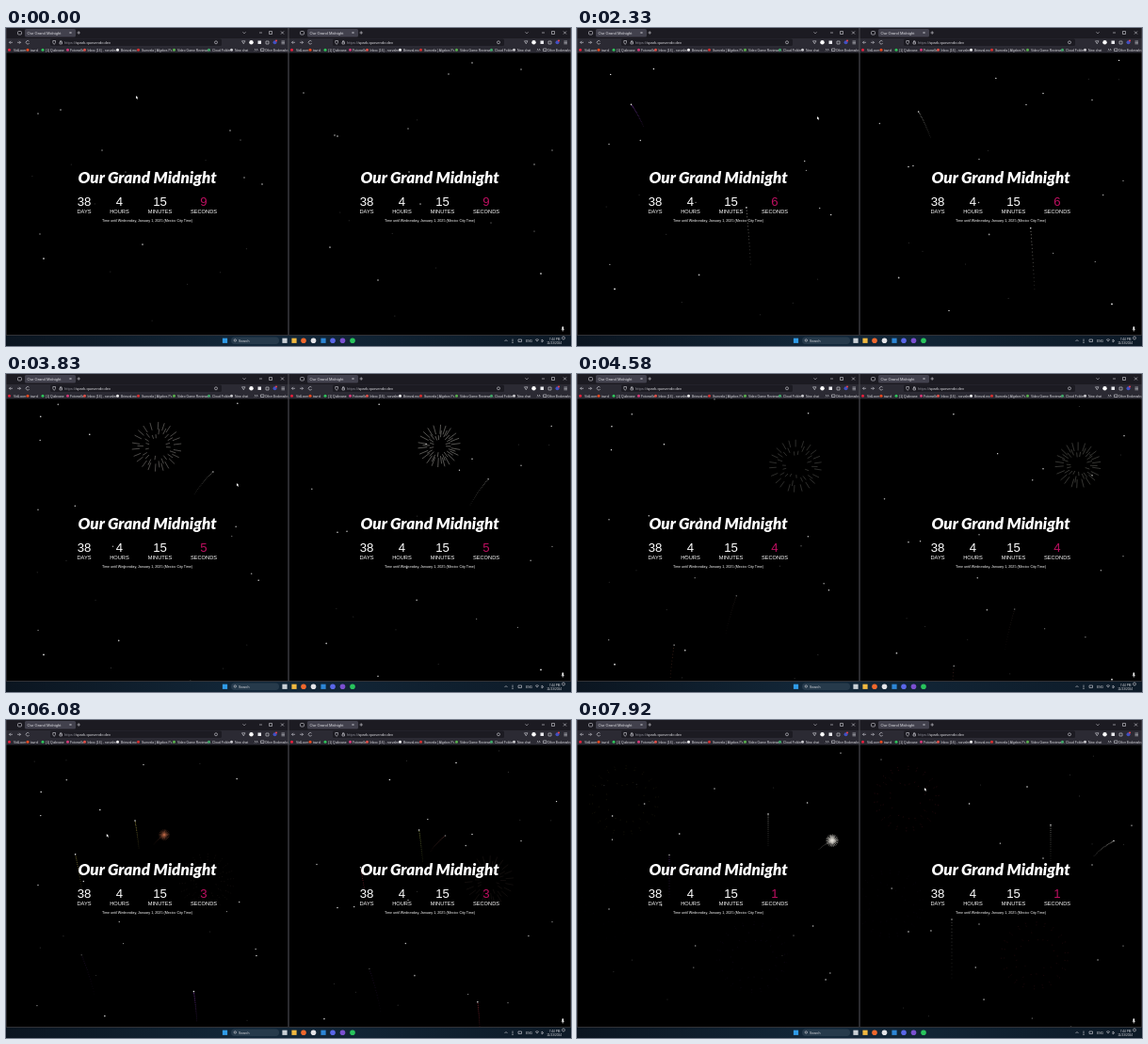
Write an HTML page with a canvas that moves like this. It is 600 px wide and 338 px high and loops after 8000 ms.

```html
<!DOCTYPE html>
<html lang="en">
<head>
<meta charset="utf-8">
<title>Midnight timer</title>
<style>
  html, body { margin: 0; width: 100%; height: 100%; overflow: hidden; background: #000; }
  canvas, svg { position: absolute; left: 0; top: 0; width: 600px; height: 338px; }
  text { font-family: "Liberation Sans", Arial, sans-serif; fill: #fff; }
  .ui { font-size: 3.6px; fill: #dddde2; }
  .tab { font-size: 4.1px; }
  .title { font: italic 900 17px Lato, cursive; }
  .num { font-size: 13.2px; }
  .label { font-size: 5.7px; }
  .note { font-size: 3.7px; }
  .mid text, .title { text-anchor: middle; }
  .seconds { fill: #bd0f60; }
  .line { fill: none; stroke: #d4d4da; stroke-width: .6; }
</style>
</head>
<body>
<canvas width="600" height="338"></canvas>
<svg viewBox="0 0 600 338">
  <defs>
    <linearGradient id="bar">
      <stop offset="0" stop-color="#0b1520"/>
      <stop offset=".45" stop-color="#13283a"/>
      <stop offset="1" stop-color="#0d1a27"/>
    </linearGradient>
    <g id="window">
      <rect width="300" height="10.5" fill="#1c1b22"/>
      <rect x="20" y="1" width="54" height="8.5" rx="1.5" fill="#42414d"/>
      <rect y="10.5" width="300" height="16" fill="#2b2a33"/>
      <rect x="47" y="11.5" width="182" height="7.5" rx="1.5" fill="#1c1b22"/>
      <rect x="12.5" y="3.5" width="4" height="3.5" rx="1" class="line"/>
      <text class="ui tab" x="22.5" y="6.5">Our Grand Midnight</text>
      <path class="line" d="M67.5 4l2 2m0-2l-2 2M75.5 5h3.4m-1.7-1.7v3.4M251.500 4.300l1.500 1.500l1.500-1.500M269 5h3M279.500 3.500h3v3h-3zM292 3.500l3 3m0-3l-3 3"/>
      <path class="line" d="M7 15.300H3.500m1.500-1.500l-1.500 1.500l1.500 1.500M12 15.300h3.500m-1.500-1.500l1.500 1.500l-1.500 1.500M24.500 14.200a1.800 1.800 0 1 0 .2 1.800M49.800 13.500h2.700v2q-.3 1.400-1.400 1.800q-1-.4-1.300-1.800zM57 15h2.500v2H57zM57.500 15v-1.200h1.500V15"/>
      <text class="ui tab" x="62" y="16.700"><tspan fill="#8b8b95">https://</tspan>spark.quovendo.dev</text>
      <circle class="line" cx="223" cy="15.300" r="1.500"/>
      <path class="line" d="M250.500 13.800h3.500l-1.700 3zM276 14h3v3h-3zM292.500 14h3.500m-3.500 1.400h3.500m-3.500 1.400h3.500"/>
      <circle cx="260.500" cy="15.300" r="2.200" fill="#fff"/>
      <rect x="267.500" y="13.500" width="3.500" height="3.500" fill="#e8e8ec"/>
      <circle cx="285.500" cy="15.300" r="2" fill="#4150c0"/>
      <circle cx="287" cy="13.500" r="1.100" fill="#e04050"/>
      <g id="bookmarks"></g>
      <path class="line" d="M264 22l1.200 1.200l-1.200 1.200M266 22l1.200 1.200l-1.200 1.200M270.500 22h3.500v2.500h-3.500z"/>
      <text class="ui" x="275" y="24.500" style="font-size:3.2px">Other Bookmarks</text>
      <text class="title" x="150" y="165">Our Grand Midnight</text>
      <g class="mid">
        <g class="num">
          <text x="83" y="189">38</text>
          <text x="120.500" y="189">4</text>
          <text x="163.500" y="189">15</text>
          <text class="seconds" id="seconds" x="210" y="189">9</text>
        </g>
        <g class="label">
          <text x="83" y="197.300">DAYS</text>
          <text x="120.500" y="197.300">HOURS</text>
          <text x="163.500" y="197.300">MINUTES</text>
          <text x="210" y="197.300">SECONDS</text>
        </g>
        <text class="note" x="150" y="206.300">Time until Wednesday, January 1, 2025 (Mexico City Time)</text>
      </g>
      <path d="M.25 0V326.500H299.750V0" fill="none" stroke="#55555c" stroke-width=".6"/>
    </g>
  </defs>
  <use href="#window"/>
  <use href="#window" x="300"/>
  <rect y="327" width="600" height="11" fill="url(#bar)"/>
  <rect x="239" y="328.500" width="51" height="7.500" rx="3.700" fill="#263a4b"/>
  <circle class="line" cx="243.300" cy="332" r="1.200"/>
  <text class="ui" x="247" y="333.500">Search</text>
  <g id="apps"></g>
  <path class="line" d="M529.500 333l1.500-1.500l1.500 1.500M538 330.500v2.500m-1 1.200h2M544 331h3.500v2.500H544zM562 331.500q2-1.500 4 0m-3 1.300q1-.8 2 0M569 331v3l1.800-1.500z"/>
  <text class="ui" x="552" y="333.500" style="font-size:3.200px">ENG</text>
  <g text-anchor="end" style="font-size:3.200px">
    <text x="588.500" y="331.600" class="ui" style="font-size:inherit">7:44 PM</text>
    <text x="590" y="335.800" class="ui" style="font-size:inherit">11/23/2024</text>
  </g>
  <circle class="line" cx="592" cy="329.500" r="1.500"/>
  <path d="M591.300 318v2.200" stroke="#fff" stroke-width="1.600" stroke-linecap="round"/>
  <path d="M589.600 320.300q1.700 2.200 3.400 0M591.300 321.400v1.200" fill="none" stroke="#fff" stroke-width=".5"/>
  <path id="cursor" d="M0 0v4l1-.8l.8 1.600l.7-.4l-.8-1.500h1.300z" fill="#fff"/>
</svg>
<script>
const LOOP = 8000, FPS = 12, GROUND = 326;
const TRAIL = 18, TRAIL_STEP = 1 / 60, BURST_LIFE = 1.15;
const ctx = document.querySelector('canvas').getContext('2d');
const seconds = document.getElementById('seconds');
const cursor = document.getElementById('cursor');

// icon x, text x, colour, label
const bookmarks = [
  [3.5, 8, '#e8203c', 'VidLoom'], [23, 26, '#f04a20', 'tavrol'],
  [39, 42, '#2fc45a', '(1) Quibvane'], [65.5, 68, '#d63a78', 'Fotomelle'],
  [83.5, 86.5, '#e05048', 'Inbox (16) - norvalm...'], [118.5, 122, '#f2f2f2', 'Brimzal.mx'],
  [140.5, 144, '#d83030', 'Sumvela | Algebra Pr...'], [178.5, 182, '#58b04c', 'Video Game Reviews,...'],
  [215.5, 219, '#3fa868', 'Cloud Folder'], [239.5, 243, '#c8c8cc', 'New chat']
];
document.getElementById('bookmarks').innerHTML = bookmarks.map(([ix, tx, color, label]) =>
  `<circle cx="${ix}" cy="23.2" r="1.5" fill="${color}"/>
   <text class="ui" x="${tx}" y="24.5" style="font-size:3.4px">${label}</text>`).join('');

const apps = [[232.5, '#2f9be8', 1], [296, '#c9d0d6', 1], [306, '#f0b840', 1], [316, '#f0682c'],
  [326.500, '#e4e4e8'], [337, '#2c86d6', 1], [347, '#5a66e8'], [357.500, '#7a4fd0'], [368, '#28c45c']];
document.getElementById('apps').innerHTML = apps.map(([x, color, square]) => square
  ? `<rect x="${x - 2.6}" y="329.7" width="5.2" height="5.2" fill="${color}"/>`
  : `<circle cx="${x}" cy="332.3" r="2.8" fill="${color}"/>`).join('');

// x, y at the start and sideways speed; all fall at the same rate
const FALL = 13.9;
const leftStars = [
  [34, 91, 0], [58, 87, 4], [238, 109, 1.6], [249, 119, -2.4], [145, 230, -6.6], [127, 153, -.4],
  [102, 130, 3], [253, 159, 2], [40, 245, 0], [35, 17, .3], [36, -8, .2], [70, 11, 4.9],
  [146, -37, 0], [247, -22, -.3], [40, -21, 4], [272, 166, -1], [36, 219, -.5], [280, -75, 0]
];
const rightStars = [
  [316, 69, 2.3], [349, 114, 3.4], [470, 49, 3], [515, 207, -4], [344, 233, -1], [561, 216, -4.6],
  [427, 107, 0], [561, 145, -1], [568, 261, 0], [570, 2, 2.4], [377, -21, 5], [478, -39, 0],
  [428, 153, -.6], [352, 115, 0], [440, 187, -1], [495, 37, 0], [580, 130, 0], [443, 21, .8],
  [547, 44, 0], [395, 268, 0], [323, -68, 0]
];

// right window runs a little behind the left one
const rocket = (launch, x0, burst, x1, y1, leftColor, rightColor, dim = 1, lag = .11) =>
  ({ launch, x0, burst, x1, y1, colors: [leftColor, rightColor], dim, lag });
const WHITE = '#e0dcd4', PURPLE = '#9a48d8', GOLD = '#c8b850', RED = '#c03848', GREY = '#b8b8b0';
const rockets = [
  rocket(.83, 112, 2.45, 52, 75, PURPLE, GREY),
  rocket(1.755, 187.6, 3.3, 160, 75, WHITE, WHITE),
  rocket(2.4, 141, 4, 232, 95, GREY, GREY, .8),
  rocket(4.4, 99, 6, 168, 122, '#b86848', '#a86058', .55),
  rocket(4, 150, 5.45, 213, 168, '#806058', '#806058', .4),
  rocket(4.8, 151.6, 6.35, 133, 90, GOLD, '#a8b850'),
  rocket(5.03, 95, 6.9, 50, 77, GOLD, RED),
  rocket(5.6, 100, 6.85, 32, 188, PURPLE, PURPLE, .3),
  rocket(5.75, 203, 6.85, 186, 243, PURPLE, RED),
  rocket(6.27, 180, 7.82, 271, 128, WHITE, WHITE),
  rocket(6.68, 203, 8.3, 203, 72, GREY, GREY),
  rocket(7.02, 98, 8.5, 98, 90, PURPLE, GREY, .7, .41)
];

// time in seconds, x, y
const pointer = [[0, 138, 72], [1.083, 39, 75], [2.333, 255, 94], [3.833, 245, 116],
  [5.333, 16, 189], [6.75, 187.5, 60.5], [7.917, 369, 72], [8, 372, 72]];

function random(seed) {
  const v = Math.sin(seed * 127.1 + 11.7) * 43758.5453;
  return v - Math.floor(v);
}

function dot(x, y, size, color, alpha) {
  ctx.globalAlpha = alpha;
  ctx.fillStyle = color;
  ctx.beginPath();
  ctx.arc(x, y, size, 0, 7);
  ctx.fill();
}

function drawStars(stars, t) {
  stars.forEach(([x, y, vx], i) =>
    dot(x + vx * t, y + FALL * t, .55 + .3 * random(i), '#fff', .55 + .45 * random(i + 40)));
}

function drawDimStars(left, t) {
  for (let i = 0; i < 12; i++) {
    const seed = left + i * 3.1;
    const x = left + 300 * random(seed) + 4 * (random(seed + 1) - .5) * t;
    dot(x, -80 + 400 * random(seed + 2) + FALL * t, .55, '#fff', .2);
  }
}

function rocketAt(r, t) {
  const p = (t - r.launch) / (r.burst - r.launch);
  return [r.x0 + (r.x1 - r.x0) * p ** 1.3, GROUND - (GROUND - r.y1) * (1.7 * p - .7 * p * p)];
}

function drawTrail(r, t, left, color) {
  for (let k = 0; k < TRAIL; k++) {
    const past = t - k * TRAIL_STEP;
    if (past < r.launch || past > r.burst) continue;
    const [x, y] = rocketAt(r, past);
    dot(left + x, y, k ? .5 : .8, k ? color : '#fff', r.dim * (k ? .75 * (1 - k / 22) : .9));
  }
}

const spread = age => 46 * (1 - Math.exp(-1.6 * Math.max(0, age)));

function drawBurst(r, age, left, color) {
  if (age < 0 || age > BURST_LIFE) return;
  const x = left + r.x1, y = r.y1 + 8 * age * age, rays = 44;
  ctx.strokeStyle = color;
  ctx.lineWidth = .65;
  ctx.setLineDash(age > .6 ? [1.2, 1.8] : []);
  ctx.globalAlpha = r.dim * .85 * (1 - age / BURST_LIFE) ** .8;
  ctx.beginPath();
  for (let i = 0; i < rays; i++) {
    const angle = (i + .5 * random(i + r.x1)) / rays * Math.PI * 2;
    const reach = i % 2 ? 1 : .45 + .4 * random(i * 2 + r.y1);
    const inner = reach * spread(age - .22), outer = reach * spread(age);
    const c = Math.cos(angle), s = Math.sin(angle);
    ctx.moveTo(x + c * inner, y + s * inner);
    ctx.lineTo(x + c * outer, y + s * outer);
  }
  ctx.stroke();
  ctx.setLineDash([]);
}

function drawSky(side, t) {
  const left = side * 300;
  ctx.save();
  ctx.beginPath();
  ctx.rect(left, 26, 300, GROUND - 26);
  ctx.clip();
  drawDimStars(left, t);
  drawStars(side ? rightStars : leftStars, t);
  for (const r of rockets) {
    const local = t - side * r.lag;
    drawTrail(r, local, left, r.colors[side]);
    drawBurst(r, local - r.burst, left, r.colors[side]);
  }
  ctx.restore();
}

function pointerAt(t) {
  const i = Math.max(1, pointer.findIndex(p => p[0] >= t));
  const [t0, x0, y0] = pointer[i - 1], [t1, x1, y1] = pointer[i];
  const p = (t - t0) / (t1 - t0);
  return [x0 + (x1 - x0) * p, y0 + (y1 - y0) * p];
}

const start = performance.now();
function draw() {
  const ms = (performance.now() - start) % LOOP;
  const t = Math.floor((ms + 4) * FPS / 1000) % (LOOP * FPS / 1000) / FPS;
  ctx.clearRect(0, 0, 600, 338);
  drawSky(0, t);
  drawSky(1, t);
  seconds.textContent = 9 - Math.floor(t + .8);
  cursor.setAttribute('transform', `translate(${pointerAt(t)}) scale(.8)`);
  requestAnimationFrame(draw);
}
draw();
</script>
</body>
</html>
```
